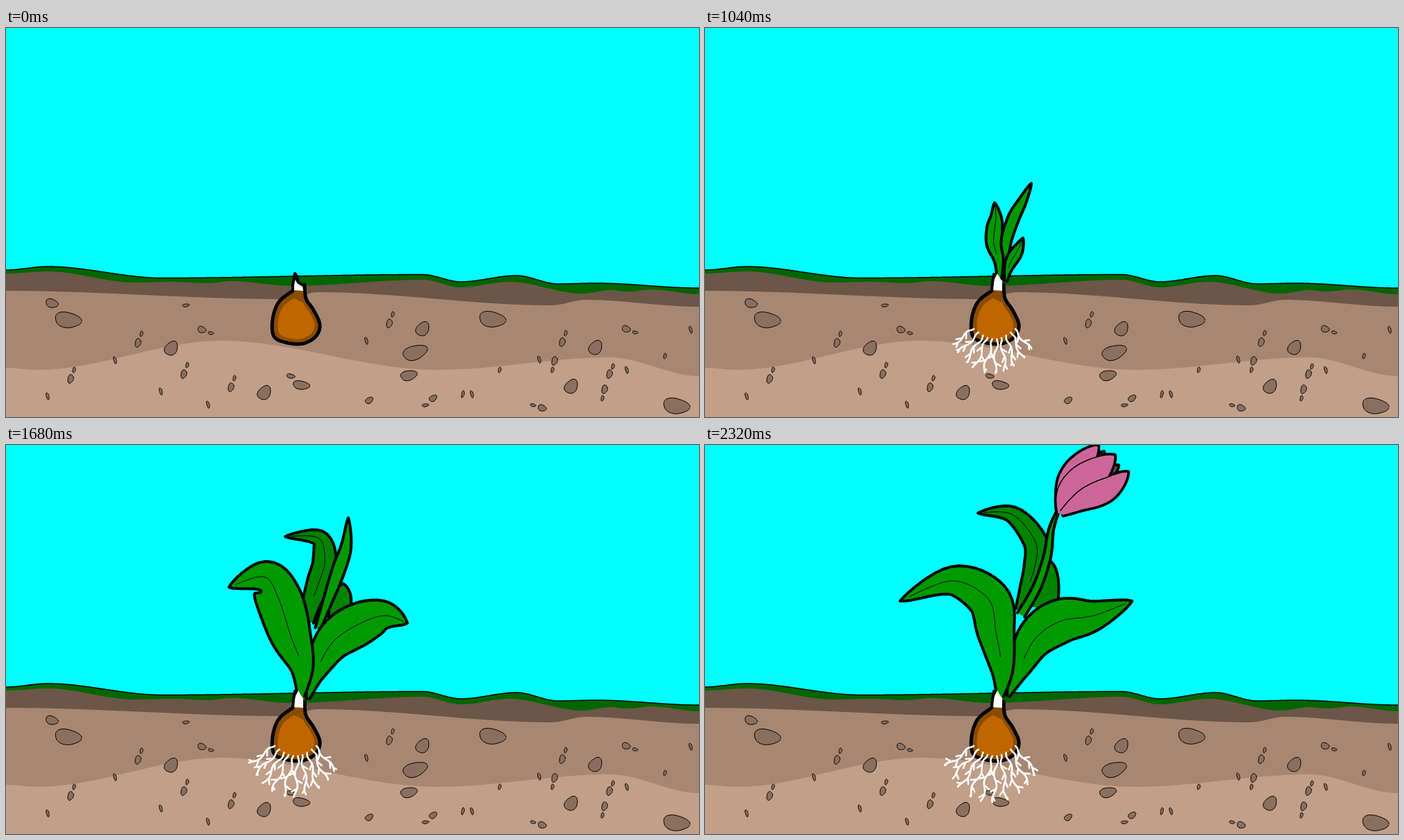
Recreate the animation shown at these times as an HTML page with a canvas. Size 998x561 px, loop 2.4 s.

```html
<!DOCTYPE html>
<html lang="en">
<head>
<meta charset="utf-8">
<title>Growing bulb</title>
<style>
html, body { margin: 0; width: 100%; height: 100%; overflow: hidden; background: #0ff; }
canvas { display: block; width: 100%; height: 100%; }
</style>
</head>
<body>
<canvas id="stage" width="998" height="561"></canvas>
<script>
const LEAF = '#009900', SHADE = '#008400';
const ground = document.createElement('canvas');
ground.width = 998;
ground.height = 561;
let ctx = ground.getContext('2d');

const mix = (a, b, f) => a + (b - a) * f;
const mixPts = (p, q, f) => p.map((a, i) => [mix(a[0], q[i][0], f), mix(a[1], q[i][1], f)]);
const parse = s => s.split(' ').map(p => p.split(',').map(Number));
const clamp = f => Math.max(0, Math.min(1, f));

// Smooth curve through the points p, as n + 1 points.
function spline(p, n = 40) {
  const m = p.length - 1;
  return Array.from({ length: n + 1 }, (_, i) => {
    const u = i / n * m, j = Math.min(m - 1, Math.floor(u)), f = u - j;
    const b = p[j], c = p[j + 1], a = p[j - 1] || b, d = p[j + 2] || c;
    return [0, 1].map(q => {
      const v = (c[q] - a[q]) / 2, w = (d[q] - b[q]) / 2, e = b[q] - c[q];
      return b[q] + f * (v + f * (-3 * e - 2 * v - w + f * (2 * e + v + w)));
    });
  });
}

function draw(pts, fill, width, color = '#000') {
  ctx.beginPath();
  pts.forEach(p => ctx.lineTo(p[0], p[1]));
  if (fill) { ctx.fillStyle = fill; ctx.fill(); }
  if (width) { ctx.lineWidth = width; ctx.strokeStyle = color; ctx.stroke(); }
}

// ---- ground: each edge eases from crest to dip ----
const layers = [
  ['#006600', '0,349 60,344 225,360.5 600,355.5 655,366 735,357 795,369 850,368 998,375'],
  ['#6b5648', '0,354 60,351 185,367 240,366 290,368 325,365 410,372 600,363 655,374 725,366 830,383 870,378 895,380 930,377 998,384'],
  ['#a88772', '0,379 400,391 450,381 785,400 835,392 998,402'],
  ['#c19f88', '0,490 45,493 310,451 620,493 870,475 998,502']
];

function edge(keys) {
  const line = [];
  keys.slice(1).forEach(([x1, y1], i) => {
    const [x0, y0] = keys[i];
    for (let x = x0; x <= x1; x++) {
      const f = (x - x0) / (x1 - x0);
      line.push([x, mix(y0, y1, f * f * (3 - 2 * f))]);
    }
  });
  return line;
}

// half width, half height, tilt, first place, shifts to its copies
const twins = '0,0 611,-1', clumps = twins + ' 362,-28 134,64', trail = clumps + ' -97,52 66,45';
const stones = [
  [19, 11, .15, '89,421', twins + ' 876,124'],
  [11, 8.5, -.9, '238,462', clumps + ' 576,55'],
  [1.9, 5.2, -.25, '157,479', trail + ' 737,14 829,-44 514,49'],
  [2, 4, .2, '195,441', trail + ' 679,47 516,52 592,52 664,93 754,32'],
  [4, 6.3, .25, '190,454', trail + ' 679,45 600,26 672,67'],
  [6, 4.5, .35, '282,435', twins + ' 490,113'],
  [4, 2, .2, '295,440', twins + ' 464,104'],
  [18, 10, -.3, '589,468', '0,0'],
  [12, 7, -.2, '580,501', '0,0'],
  [12, 6, .15, '425,515', '0,0'],
  [9, 6, .3, '66,397', '0,0'],
  [6, 4, -.6, '523,537', '0,0 92,-3'],
  [6, 3, .2, '410,502', '0,0'],
  [5, 2, -.1, '259,400', '0,0 345,144'],
  [1.8, 5.2, .2, '658,528', '0,0']
];

function drawStone(x, y, w, h, tilt) {
  const c = Math.cos(tilt), s = Math.sin(tilt), egg = [];
  for (let a = 0; a < 6.4; a += .2) {
    const r = 1 + .07 * Math.cos(3 * a + .6), u = w * r * Math.cos(a), v = h * r * Math.sin(a);
    egg.push([x + u * c - v * s, y + u * s + v * c]);
  }
  draw(egg, '#8a6f5f', 1);
}

function paintGround() {
  ctx.fillStyle = '#0ff';
  ctx.fillRect(0, 0, 998, 561);
  for (const [color, keys] of layers)
    draw([...edge(parse(keys)), [998, 561], [0, 561]], color);
  draw(edge(parse(layers[0][1])), null, 1.5);
  for (const [w, h, tilt, place, shifts] of stones) {
    const [[x, y]] = parse(place);
    for (const [dx, dy] of parse(shifts)) drawStone(x + dx, y + dy, w, h, tilt);
  }
}

// ---- blades: time -> "base width,belly width" and the midrib from base to tip ----
const nub = (x, y, n) => '0,0' + ` ${x},${y}`.repeat(n);
const blade = poses => Object.entries(poses)
  .map(([t, s]) => ({ t: +t, pts: parse(s) })).sort((a, b) => a.t - b.t);

const stem = blade({
  '-80': '2,0 416,378 416,372 416,366 416,360 416,355',
  720: '4,1 424,360 429,338 434,318 441,295 449,271',
  1040: '6,3 431,345 433,310 444,275 457,250 470,224',
  1360: '5,0 441,290 457,262 477,230 492,205 517,187',
  1680: '4,6 449,265 465,220 479,180 490,145 493,105',
  2080: '5,1 448,258 470,210 486,170 490,125 499,70',
  2320: '6,0 455,245 478,205 493,160 499,120 514,82'
});
const leftLeaf = blade({
  400: nub(417, 354, 6),
  720: '3,2 419,358 417,350 416,345 415,340 415,335 416,332',
  1040: '3,9 424,362 423,335 416,312 417,290 419,272 417,252',
  1360: '6,15 424,362 423,318 420,275 418,238 403,204 362,202',
  1680: '5,29 425,362 426,320 410,275 392,220 371,190 321,205',
  2080: '5,26 424,362 425,320 416,268 404,220 350,194 291,216',
  2320: '5,26 425,362 428,325 419,270 408,222 355,196 281,225'
});
const rightLeaf = blade({
  400: nub(432, 360, 6),
  720: '2,2 431,362 432,359 433,356 434,353 436,350 438,348',
  1040: '2,7 433,365 436,350 440,338 447,326 453,315 458,303',
  1360: '3,14 435,368 444,335 456,302 470,275 483,243 517,240',
  1680: '2,29 435,366 446,328 470,285 505,260 545,246 578,257',
  2080: '2,29 433,364 447,328 470,283 510,259 558,252 609,279',
  2320: '2,30 437,362 452,325 475,280 512,254 560,246 615,225'
});
const backLeaf = blade({
  1040: nub(430, 310, 6),
  1360: '4,8 438,268 438,256 440,247 443,238 447,226 451,214',
  1680: '9,10 434,255 440,228 450,200 459,168 450,134 402,132',
  2080: '6,12 442,255 450,225 462,185 465,145 428,111 376,120',
  2320: '5,13 452,238 463,210 475,175 476,140 442,100 393,98'
});
const sideLeaf = blade({
  1040: nub(438, 300, 2),
  1360: '4,5 452,288 462,256',
  1680: '13,4 478,252 486,200',
  2080: '19,0 483,242 494,182',
  2320: '19,0 488,236 498,168'
});
const petals = [
  ['6,17 500,80 497,52 518,28 557,27', '5,13 512,99 521,57 543,27 566,1'],
  ['6,17 500,80 497,52 518,28 557,27', '5,20 512,99 525,70 557,43 590,15'],
  ['6,17 503,80 520,70 540,53 557,28', '4,14 514,98 543,80 580,63 609,39']
].map(([bud, bloom]) => blade({ 1680: nub(493, 108, 4), 2080: bud, 2320: bloom }));
const innerPetals = ['2,8 535,62 575,9', '2,8 545,66 596,29']
  .map(bloom => blade({ 2080: nub(525, 45, 2), 2320: bloom }));

// Rib and outline at time t; null while the blade has not sprouted.
function shape(keys, t) {
  if (t <= keys[0].t) return null;
  const j = keys.findIndex(k => k.t >= t), a = keys[j - 1], b = keys[j];
  let f = (t - a.t) / (b.t - a.t);
  if (j === 1) f *= f;
  const [[base, belly], ...spine] = mixPts(a.pts, b.pts, f);
  const rib = spline(spine), left = [], right = [];
  rib.forEach(([x, y], i) => {
    const p = rib[Math.max(0, i - 1)], q = rib[Math.min(40, i + 1)], u = i / 40;
    const dx = q[0] - p[0], dy = q[1] - p[1];
    const k = (base * (1 - u ** 3) + belly * Math.sin(Math.PI * u ** 1.25)) / (Math.hypot(dx, dy) || 1);
    left.push([x + dy * k, y - dx * k]);
    right.unshift([x - dy * k, y + dx * k]);
  });
  return { rib, outline: [...left, ...right] };
}

function drawLeaf(keys, t, fill, ribFrom = Infinity) {
  const leaf = shape(keys, t);
  if (!leaf) return;
  draw(leaf.outline, fill, 4);
  if (t >= ribFrom) draw(leaf.rib.slice(11, 39), null, 1);
}

function drawFlower(t) {
  innerPetals.forEach(p => drawLeaf(p, t, '#85405f'));
  const shapes = petals.map(p => shape(p, t)).filter(Boolean);
  const f = clamp((t - 1680) / 270);
  const pink = `rgb(${mix(0, 204, f)},${mix(153, 102, f)},${mix(0, 153, f)})`;
  shapes.forEach(s => draw(s.outline, null, 6));
  shapes.forEach(s => draw(s.outline, pink, 1.5));
}

// ---- bulb ----
const bulb = spline(parse('413,379 393,395 384,420 386,445 405,454 428,455 446,445 452,428 443,407 432,390 430,370'), 80);
const bulbGlow = bulb.slice(0, 74).map(([x, y]) => [mix(419, x, .77), mix(425, y, .77)]);

function drawBulb(t) {
  draw(bulb, '#8a4c00', 5);
  draw(bulbGlow, '#bf6600');
  const bare = t < 80;
  draw(parse(bare ? '414,378 416,363 420,368 427,373 428,379' : '414,378 417,362 421,354 425,361 428,365 428,379'), '#fff');
  draw(parse(bare ? '413,380 413,370 416,354 419,358 421,367 430,372 430,380' : '413,379 414,366 416,355'), null, 4);
}

// ---- roots: a wavy fan, with twigs on alternating sides ----
const roots = Array.from({ length: 10 }, (_, i) => {
  const f = i / 9, arch = Math.sin(Math.PI * f), a = Math.PI * mix(.8, .3, f);
  const size = 50 + 17 * arch;
  return Array.from({ length: 61 }, (_, j) => {
    const s = j / 60 * size, w = 2.5 * Math.sin(s / 6 + i * 2) * Math.min(1, s / 8);
    return [mix(387, 447, f) + s * Math.cos(a) - w * Math.sin(a),
            434 + 15 * arch + s * Math.sin(a) + w * Math.cos(a)];
  });
});

function drawRoots(t) {
  if (!t) return;
  const reach = 60 * (t / 2320) ** .4;
  roots.forEach((p, r) => {
    draw(p.slice(0, Math.round(reach) + 1), null, 2.7, '#fff');
    for (let i = 14 + r % 3 * 3, side = r % 2 ? 1 : -1; i < reach; i += 11, side = -side) {
      const [x, y] = p[i], a = Math.atan2(p[i + 1][1] - y, p[i + 1][0] - x) + side * .75;
      const len = Math.min(9, (reach - i) * .9);
      draw([[x, y], [x + len * Math.cos(a), y + len * Math.sin(a)]], null, 2.5, '#fff');
    }
  });
}

function render(t) {
  ctx.drawImage(ground, 0, 0);
  drawLeaf(sideLeaf, t, SHADE);
  drawLeaf(backLeaf, t, SHADE, 1600);
  drawLeaf(stem, t, LEAF);
  drawFlower(t);
  drawLeaf(rightLeaf, t, LEAF, 960);
  drawLeaf(leftLeaf, t, LEAF, 960);
  drawBulb(t);
  drawRoots(t);
}

paintGround();
ctx = document.getElementById('stage').getContext('2d');
ctx.lineCap = ctx.lineJoin = 'round';
const start = performance.now();
function tick() {
  const t = Math.max(0, performance.now() - start) % 2400;
  render(Math.floor(t / 80) * 80);
  requestAnimationFrame(tick);
}
tick();
</script>
</body>
</html>
```
